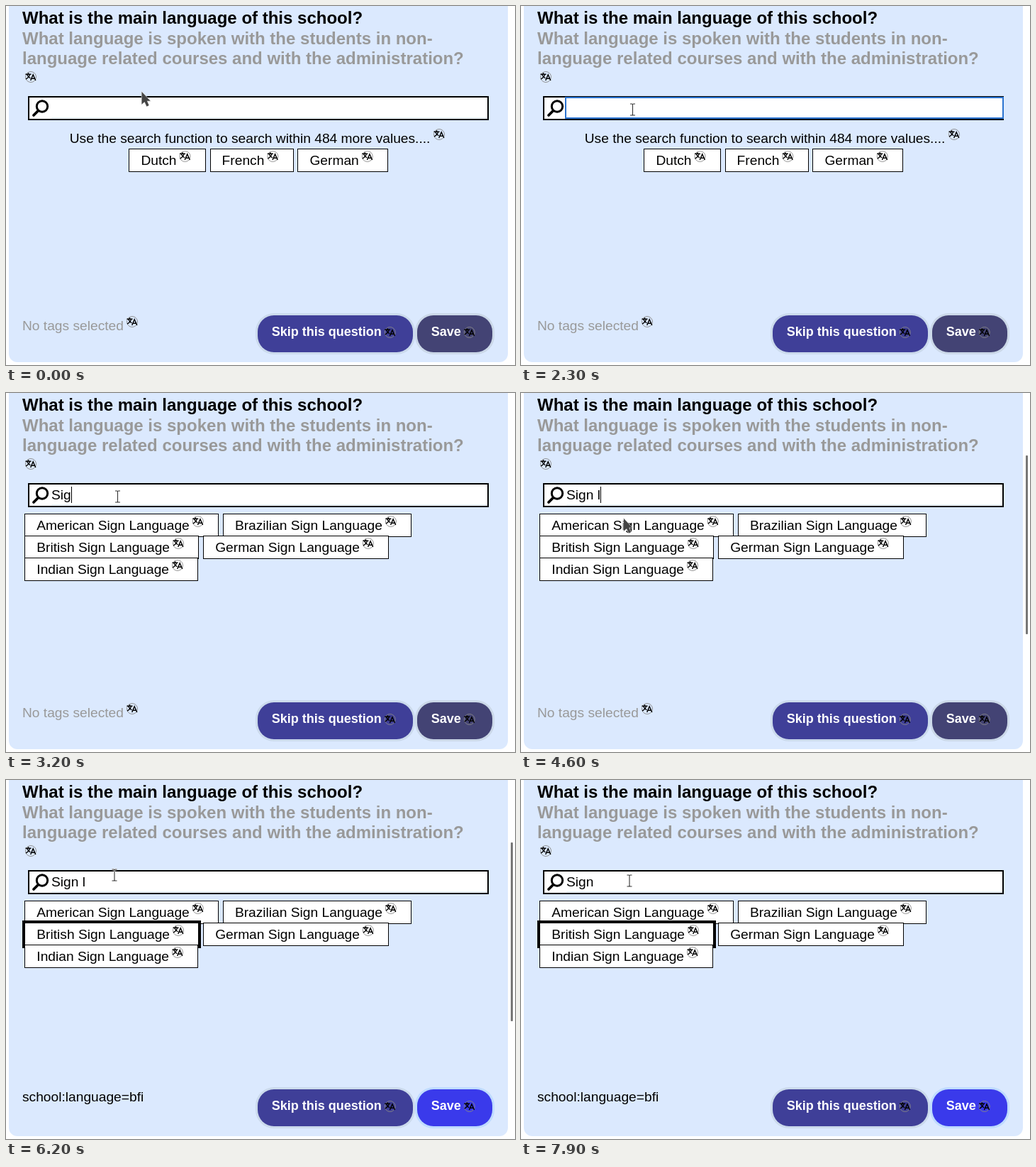
An HTML page with a canvas for the animation above (8000 ms loop, 718 by 506 pixels).

```html
<!DOCTYPE html>
<html lang="en">
<head>
<meta charset="utf-8">
<title>School language question</title>
<style>
  html, body { margin: 0; width: 100%; height: 100%; overflow: hidden; background: #fff; }
  canvas { display: block; }
</style>
</head>
<body>
<canvas id="stage" width="718" height="506"></canvas>
<script>
const ctx = document.getElementById("stage").getContext("2d");
const LOOP = 8000, STEP = 100;
const BODY = "19.2px 'Liberation Sans', Arial, sans-serif";
const TITLE = "bold 24px 'Liberation Sans', Arial, sans-serif";
const BUTTON = "bold 18px 'Liberation Sans', Arial, sans-serif";
const PANEL = "#dbe9fe", MUTED = "#999";

const COMMON = ["Dutch", "French", "German"];
const MATCHES_S = ("Afrikaans,Albanian,Alsatian,Ambonese,American Sign Language,Amis,Aragonese," +
  "Arakanese,Assamese,Asturian,Balinese,Bashkir,Basque,Belarusian,Bishnupriya Manipuri," +
  "Bislama,Bosnian,Brazilian Portuguese,Brazilian Sign Language,British Sign Language,Bugis," +
  "Burmese,Burushaski,Capiznon,Central Alaskan Yup'ik,Central Atlas Tamazight,Chinese," +
  "Chuvash,Classical Armenian,Cornish,Corsican").split(",");
const MATCHES_SIGN = ["American", "Brazilian", "British", "German", "Indian"]
  .map(name => name + " Sign Language");

// [time, value]: each value holds until the next entry
const TYPING = [[0, ""], [3100, "S"], [3200, "Sig"], [3300, "Sign"], [3500, "Sign "],
  [3700, "Sign l"], [7400, "Sign "], [7500, "Sign"]];
const CARET = [[0, false], [1000, true], [1900, false], [3100, true], [4700, false],
  [6600, true], [7900, false]];
const FOCUS_RING = [[0, false], [1000, true], [3100, false], [6900, true], [7400, false]];

// [time, x, y] of the pointer
const POINTER = [[0, 191.5, 121], [400, 191.5, 121], [600, 172, 134], [800, 157.5, 146],
  [4500, 157.5, 146], [4600, 145, 177], [5000, 166, 199], [5400, 197, 213],
  [5600, 160, 224], [5900, 160, 224], [6000, 172, 195], [6200, 153, 134],
  [6400, 153, 142], [LOOP, 153, 142]];

const held = (track, t) => track.filter(([start]) => start <= t).pop()[1];

function pointerAt(t) {
  const i = POINTER.findIndex(([time]) => time > t);
  const [t0, x0, y0] = POINTER[i - 1], [t1, x1, y1] = POINTER[i];
  const k = (t - t0) / (t1 - t0);
  return [x0 + (x1 - x0) * k, y0 + (y1 - y0) * k];
}

function scrollbarAlpha(t) {
  const fade = start => Math.max(0, 1 - (t - start + STEP) / 500);
  if (t < 500) return 0;
  if (t < 4600) return t < 1900 ? 1 : fade(1900);
  return t < 7400 ? 1 : fade(7400);
}

function text(string, x, y, color = "#000", font = BODY) {
  ctx.font = font;
  ctx.fillStyle = color;
  ctx.fillText(string, x, y);
}

function rect(x, y, w, h, color) {
  ctx.fillStyle = color;
  ctx.fillRect(x, y, w, h);
}

function rounded(x, y, w, h, radius, color) {
  ctx.fillStyle = color;
  ctx.beginPath();
  ctx.roundRect(x, y, w, h, radius);
  ctx.fill();
}

function stroke(path, color, width) {
  ctx.strokeStyle = color;
  ctx.lineWidth = width;
  ctx.stroke(new Path2D(path));
}

function translateIcon(x, y) {
  ctx.save();
  ctx.translate(x, y);
  ctx.beginPath();
  ctx.arc(0, 0, 7.5, 0, 7);
  ctx.strokeStyle = "#888";
  ctx.lineWidth = 0.9;
  ctx.stroke();
  stroke("M-7.5-3.8H.5M-3.5-5.8V-3.8M-1.3-3.8Q-2.5 1-7 3M-5.5-3.8Q-4 0-.5 2", "#000", 1.4);
  stroke("M-.3 5L3.2-3.2L6.8 5M1.2 2.3H5.4", "#000", 1.5);
  ctx.restore();
}

function tag(label, x, y, width, selected) {
  const left = Math.round(x), w = Math.round(x + width + 58.3) - left, top = y - 23;
  const extra = selected ? 3 : 0;
  rect(left - extra, top - extra, w + 2 * extra, 33 + 2 * extra, "#000");
  rect(left + 1, top + 1, w - 2, 31, "#fff");
  text(label, x + 17, y);
  translateIcon(x + 17 + width + 12, y - 12);
}

function tagList(labels, startX, startY, selected) {
  let x = startX, y = startY;
  ctx.save();
  ctx.beginPath();
  ctx.rect(0, 165, 700, 260);
  ctx.clip();
  for (const label of labels) {
    ctx.font = BODY;
    const width = ctx.measureText(label).width;
    if (x + width + 58 > 690) {
      x = startX;
      y += 31;
    }
    tag(label, x, y, width, label === selected);
    x += width + 64.1;
  }
  ctx.restore();
}

function pillButton(label, x, width, color, ring) {
  rounded(x - 3, 433, width + 6, 58, 26, ring);
  rounded(x, 436, width, 52, 23, color);
  text(label, x + 19.7, 465, "#fff", BUTTON);
  translateIcon(x + 19.7 + ctx.measureText(label).width + 12, 460);
}

function searchField(typed, caret, focusRing) {
  rect(31, 127, 650, 34, "#000");
  rect(33, 129, 646, 30, "#fff");
  rect(64, 157, 615, 1, PANEL);
  ctx.lineCap = "round";
  stroke("M45 148L39 154", "#000", 3.8);
  ctx.lineCap = "butt";
  ctx.lineWidth = 3;
  ctx.beginPath();
  ctx.arc(51, 141.5, 7.7, 0, 7);
  ctx.stroke();
  if (focusRing) {
    rect(62, 128, 619, 31, "#2b74d1");
    rect(64, 130, 615, 27, "#fff");
  }
  text(typed, 64, 150);
  if (caret) rect(Math.floor(64 + ctx.measureText(typed).width + 0.3), 132, 1, 23, "#000");
}

function drawPointer(x, y) {
  const overField = x > 62 && x < 681 && y >= 127 && y < 161;
  ctx.save();
  ctx.translate(x, y);
  if (overField) {
    const beam = "M-3.5-8H-1Q0-8 0-7V7Q0 8-1 8H-3.5M3.5-8H1Q0-8 0-7M0 7Q0 8 1 8H3.5";
    stroke(beam, "#fff", 2.4);
    stroke(beam, "#333", 1.1);
  } else {
    const arrow = "M0 0V17.5L4 14L7 20.5L10 19L7.3 12.8H12Z";
    stroke(arrow, "#ddd", 1.2);
    ctx.fillStyle = "#444";
    ctx.fill(new Path2D(arrow));
  }
  ctx.restore();
}

function draw(t) {
  const typed = held(TYPING, t), answered = t >= 5800;
  rect(0, 0, 718, 506, "#fff");
  rounded(4, -30, 704, 532, 12, PANEL);

  text("What is the main language of this school?", 23, 25, "#000", TITLE);
  text("What language is spoken with the students in non-", 23, 54, MUTED, TITLE);
  text("language related courses and with the administration?", 23, 82, MUTED, TITLE);
  translateIcon(35, 100);
  searchField(typed, held(CARET, t), held(FOCUS_RING, t));

  if (!typed) {
    text("Use the search function to search within 484 more values....", 89.7, 193);
    translateIcon(611, 181);
    tagList(COMMON, 173.4, 224);
  } else if (typed === "S") {
    tagList(MATCHES_S, 26.3, 193);
    rounded(684, 171, 3, 37, 1, "#777");
  } else {
    tagList(MATCHES_SIGN, 26.3, 193, answered && "British Sign Language");
  }

  if (answered) {
    text("school:language=bfi", 23, 453);
  } else {
    text("No tags selected", 23, 457, MUTED);
    translateIcon(178, 445);
  }
  pillButton("Skip this question", 355, 219, "#3f3f98", "#cbdaec");
  pillButton("Save", 580, 106, answered ? "#3a3aeb" : "#434374", answered ? "#bfdbfe" : "#cbd8e8");

  ctx.globalAlpha = scrollbarAlpha(t);
  rounded(712, 88, 3, 252, 1, "#777");
  ctx.globalAlpha = 1;
  drawPointer(...pointerAt(t));
}

function tick(now) {
  draw(Math.floor((now % LOOP) / STEP) * STEP);
  requestAnimationFrame(tick);
}
requestAnimationFrame(tick);
</script>
</body>
</html>
```
